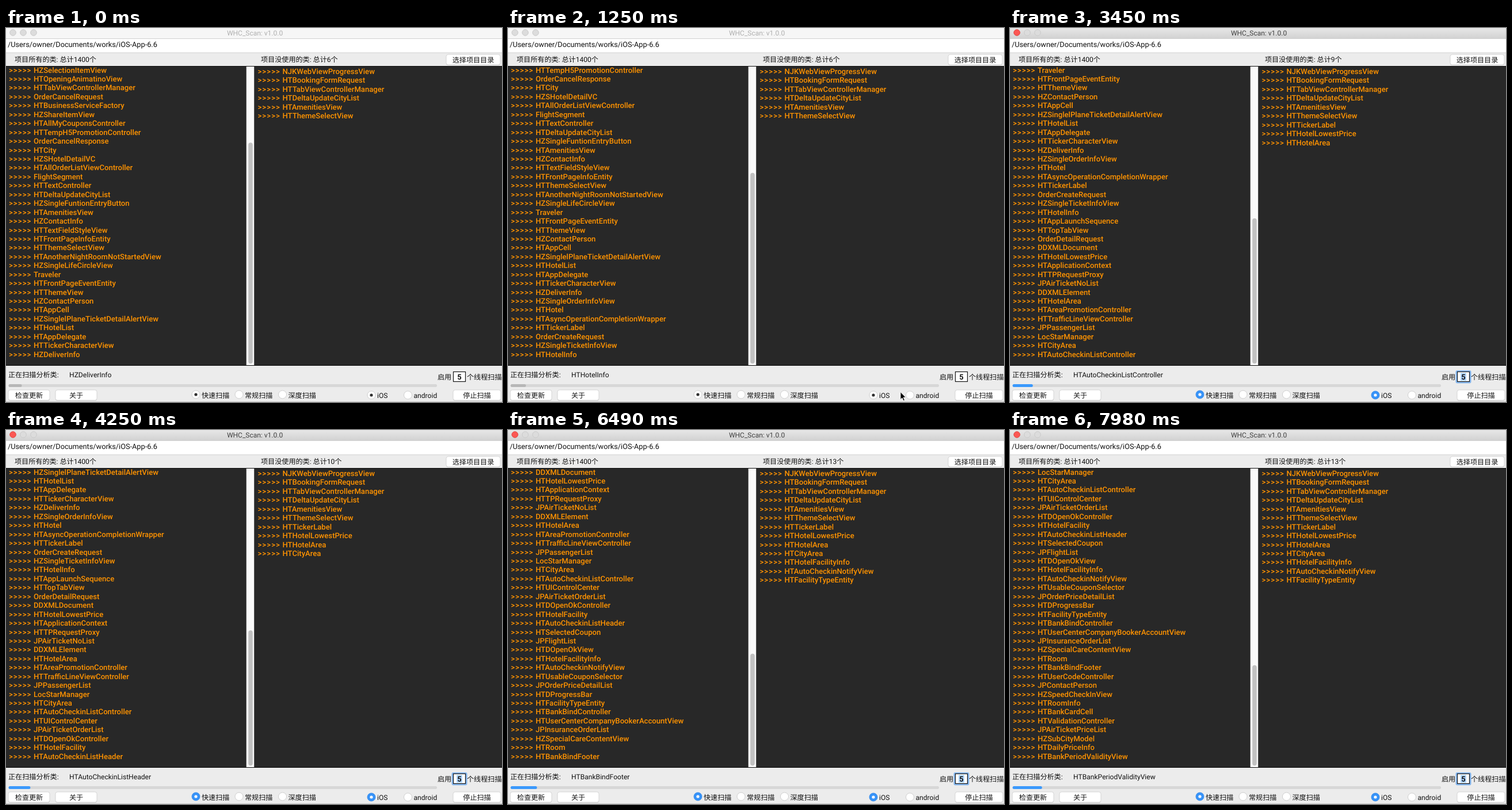
These frames come from a looping animation (862 by 650 pixels, 8000 ms). An HTML page:

```html
<!DOCTYPE html>
<html lang="zh-CN">
<head>
<meta charset="utf-8">
<title>WHC_Scan</title>
<style>
  html, body { margin: 0; width: 100%; height: 100%; overflow: hidden; background: #ececec; }
  svg { display: block; }
  text {
    font: 12.1px Roboto, "Noto Sans CJK SC", "Noto Sans CJK", sans-serif;
    fill: #111; white-space: pre; text-rendering: geometricPrecision;
  }
  .mid { text-anchor: middle; }
  .list text { font-size: 13.1px; font-weight: 500; fill: #ff9300; }
  .list .arrows { letter-spacing: 1.1px; }
  .title { fill: #afafaf; font-size: 12px; }
  .bar { fill: #f6f6f6; }
  .light { fill: #dcdcdc; stroke: #cbcbcb; }
  .fill { fill: #b7b7b7; }
  .dial { fill: #fff; stroke: #c6c6c6; stroke-width: .8; }
  .dot { fill: #303030; }
  .focus { visibility: hidden; }
  .active .title { fill: #404040; }
  .active .bar { fill: url(#barShade); }
  .active .light.close { fill: #fc5753; stroke: #df4744; }
  .active .fill { fill: #3b99fc; }
  .active .dial.on { fill: #3793f8; stroke: #2b85ea; }
  .active .dot { fill: #fff; }
  .active .focus { visibility: visible; }
</style>
</head>
<body>
<svg id="stage" width="862" height="650" viewBox="0 0 862 650">
  <defs>
    <linearGradient id="barShade" x2="0" y2="1">
      <stop stop-color="#e7e7e7"/><stop offset="1" stop-color="#d2d2d2"/>
    </linearGradient>
    <clipPath id="panes"><rect y="67" width="862" height="519"/></clipPath>
  </defs>
  <rect width="862" height="650" fill="#ececec"/>
  <rect class="bar" width="862" height="18"/>
  <rect y="18" width="862" height="1" fill="#d0d0d0"/>
  <circle class="light close" cx="12" cy="8" r="5.3"/>
  <circle class="light" cx="30" cy="8" r="5.3"/>
  <circle class="light" cx="48" cy="8" r="5.3"/>
  <text class="title mid" x="432.5" y="12.7">WHC_Scan: v1.0.0</text>

  <rect y="19" width="862" height="24" fill="#fff"/>
  <rect y="42.5" width="862" height="1" fill="#d2d2d2"/>
  <text x="3" y="33.3" style="font-size:12.75px">/Users/owner/Documents/works/iOS-App-6.6</text>
  <text x="15" y="59.3">项目所有的类: 总计1400个</text>
  <text id="unusedTotal" x="443" y="59.3"></text>

  <rect y="66" width="862" height="521" fill="#0c0c0c"/>
  <rect y="67" width="418" height="519" fill="#282828"/>
  <rect x="432" y="67" width="430" height="519" fill="#282828"/>
  <rect x="417.7" y="67" width="13.6" height="519" fill="#fafafa"/>
  <rect id="thumb" x="421.2" width="7.6" rx="3.8" fill="#c1c1c1"/>
  <g class="list" clip-path="url(#panes)">
    <g id="allList"></g>
    <g id="unusedList"></g>
  </g>

  <text x="4" y="606.5">正在扫描分析类:</text>
  <text id="current" x="110" y="606.5"></text>
  <text x="750" y="611.3">启用</text>
  <rect class="focus" x="774.5" y="595" width="27" height="22.5" rx="3" fill="#86b7ee"/>
  <rect x="777.5" y="597.5" width="21" height="17" fill="#fff" stroke="#161616" stroke-width="1.2"/>
  <rect class="focus" x="783" y="599.5" width="10" height="13.5" fill="#b2d7ff"/>
  <text class="mid" x="788" y="611" style="font-size:13px;font-weight:700">5</text>
  <text x="801" y="611.3">个线程扫描</text>

  <rect x="4.5" y="619" width="744.5" height="5" rx="2.5" fill="#d7d7d7"/>
  <rect id="progress" class="fill" x="4.5" y="619" height="5" rx="2.5"/>
  <g id="controls"></g>
  <rect y="649" width="862" height="1" fill="#c9c9c9"/>
  <path id="cursor" d="M682 632.5v13.2l3-2.8 2.2 5 2.2-1-2.2-4.8h4.2z" fill="#000" stroke="#fff" stroke-width=".9"/>
</svg>
<script>
const LOOP = 8000, ROWS = 33, PITCH = 15.44;
const ACTIVATED_AT = 3434, CURSOR_FROM = 1250, CURSOR_TO = 1400;

const classes = `HZSelectionItemView HTOpeningAnimatinoView HTTabViewControllerManager OrderCancelRequest
HTBusinessServiceFactory HZShareItemView HTAllMyCouponsController HTTempH5PromotionController
OrderCancelResponse HTCity HZSHotelDetailVC HTAllOrderListViewController FlightSegment HTTextController
HTDeltaUpdateCityList HZSingleFuntionEntryButton HTAmenitiesView HZContactInfo HTTextFieldStyleView
HTFrontPageInfoEntity HTThemeSelectView HTAnotherNightRoomNotStartedView HZSingleLifeCircleView Traveler
HTFrontPageEventEntity HTThemeView HZContactPerson HTAppCell HZSinglelPlaneTicketDetailAlertView HTHotelList
HTAppDelegate HTTickerCharacterView HZDeliverInfo HZSingleOrderInfoView HTHotel
HTAsyncOperationCompletionWrapper HTTickerLabel OrderCreateRequest HZSingleTicketInfoView HTHotelInfo
HTAppLaunchSequence HTTopTabView OrderDetailRequest DDXMLDocument HTHotelLowestPrice HTApplicationContext
HTTPRequestProxy JPAirTicketNoList DDXMLElement HTHotelArea HTAreaPromotionController
HTTrafficLineViewController JPPassengerList LocStarManager HTCityArea HTAutoCheckinListController
HTUIControlCenter JPAirTicketOrderList HTDOpenOkController HTHotelFacility HTAutoCheckinListHeader
HTSelectedCoupon JPFlightList HTDOpenOkView HTHotelFacilityInfo HTAutoCheckinNotifyView
HTUsableCouponSelector JPOrderPriceDetailList HTDProgressBar HTFacilityTypeEntity HTBankBindController
HTUserCenterCompanyBookerAccountView JPInsuranceOrderList HZSpecialCareContentView HTRoom HTBankBindFooter
HTUserCodeController JPContactPerson HZSpeedCheckInView HTRoomInfo HTBankCardCell HTValidationController
JPAirTicketPriceList HZSubCityModel HTDailyPriceInfo HTBankPeriodValidityView`.split(/\s+/);

const unused = `NJKWebViewProgressView HTBookingFormRequest HTTabViewControllerManager HTDeltaUpdateCityList
HTAmenitiesView HTThemeSelectView HTTickerLabel HTHotelLowestPrice HTHotelArea HTCityArea
HTHotelFacilityInfo HTAutoCheckinNotifyView HTFacilityTypeEntity`.split(/\s+/);

// [time in ms, classes scanned since the loop began]
const steps = [
  [0, 0], [150, 1], [510, 3], [655, 4], [800, 5], [1100, 7], [1400, 9], [1560, 10], [1720, 12], [1880, 13],
  [2180, 15], [2320, 16], [2620, 18], [2770, 19], [3090, 21], [3262, 22], [3434, 23], [3606, 24], [3778, 25],
  [3950, 26], [4250, 28], [4400, 29], [4700, 31], [5000, 33], [5150, 34], [5300, 35], [5450, 36], [5750, 38],
  [5900, 39], [6045, 40], [6190, 41], [6490, 43], [6640, 44], [6940, 46], [7230, 48], [7380, 49], [7530, 50],
  [7680, 51], [7980, 53],
];

const $ = id => document.getElementById(id);

function add(parent, tag, attrs, text = '') {
  const node = document.createElementNS('http://www.w3.org/2000/svg', tag);
  for (const key in attrs) node.setAttribute(key, attrs[key]);
  node.textContent = text;
  return parent.appendChild(node);
}

function addRows(parent, count, x, y) {
  return Array.from({ length: count }, (_, i) => {
    const row = add(parent, 'g', { transform: `translate(${x} ${y + i * PITCH})` });
    add(row, 'text', { class: 'arrows' }, '>>>>>');
    const name = add(row, 'text', { x: 43.1 });
    return { row, name };
  });
}

function addButton(x, y, width, label) {
  const g = $('controls');
  add(g, 'rect', { x, y: y + .8, width, height: 18, rx: 3.5, fill: '#c3c3c3' });
  add(g, 'rect', { x, y, width, height: 18, rx: 3.5, fill: '#fff', stroke: '#cdcdcd', 'stroke-width': .8 });
  add(g, 'text', { class: 'mid', x: x + width / 2, y: y + 13.5 }, label);
}

function addRadio(x, y, label, on) {
  const g = $('controls');
  add(g, 'circle', { class: on ? 'dial on' : 'dial', cx: x, cy: y, r: 7 });
  if (on) add(g, 'circle', { class: 'dot', cx: x, cy: y, r: 2.6 });
  add(g, 'text', { x: x + 10, y: 642.8 }, label);
}

addButton(765, 46, 94, '选择项目目录');
addButton(4, 629, 72, '检查更新');
addButton(86, 629, 72, '关于');
addButton(777, 629, 83, '停止扫描');
addRadio(330, 637, '快速扫描', true);
addRadio(405, 637, '常规扫描');
addRadio(480.5, 637, '深度扫描');
addRadio(635, 638, 'iOS', true);
addRadio(698.5, 638, 'android');

const allRows = addRows($('allList'), ROWS, 4.9, 77.6);
const unusedRows = addRows($('unusedList'), unused.length, 437.4, 80);
unusedRows.forEach(({ name }, i) => name.textContent = unused[i]);

// A class is reported as unused six scans after its own turn.
const reportedAt = unused.map((name, i) => i < 6 ? 0 : classes.indexOf(name) - ROWS + 7);

function showScan(scanned) {
  allRows.forEach(({ name }, i) => name.textContent = classes[scanned + i]);
  const found = reportedAt.filter(n => n <= scanned).length;
  unusedRows.forEach(({ row }, i) => row.setAttribute('visibility', i < found ? 'visible' : 'hidden'));
  $('unusedTotal').textContent = `项目没使用的类: 总计${found}个`;
  $('current').textContent = classes[scanned + ROWS - 1];
  const height = 16970 / (44.2 + scanned);
  $('thumb').setAttribute('height', height);
  $('thumb').setAttribute('y', 583.3 - height);
  $('progress').setAttribute('width', 23 + scanned * 745 / 1400);
}

let shown = -1;
const start = performance.now();

function tick() {
  const t = (performance.now() - start) % LOOP;
  const scanned = steps.findLast(([time]) => time <= t)[1];
  if (scanned !== shown) showScan(shown = scanned);
  $('stage').classList.toggle('active', t >= ACTIVATED_AT);
  $('cursor').setAttribute('visibility', t >= CURSOR_FROM && t < CURSOR_TO ? 'visible' : 'hidden');
  requestAnimationFrame(tick);
}
tick();
</script>
</body>
</html>
```
